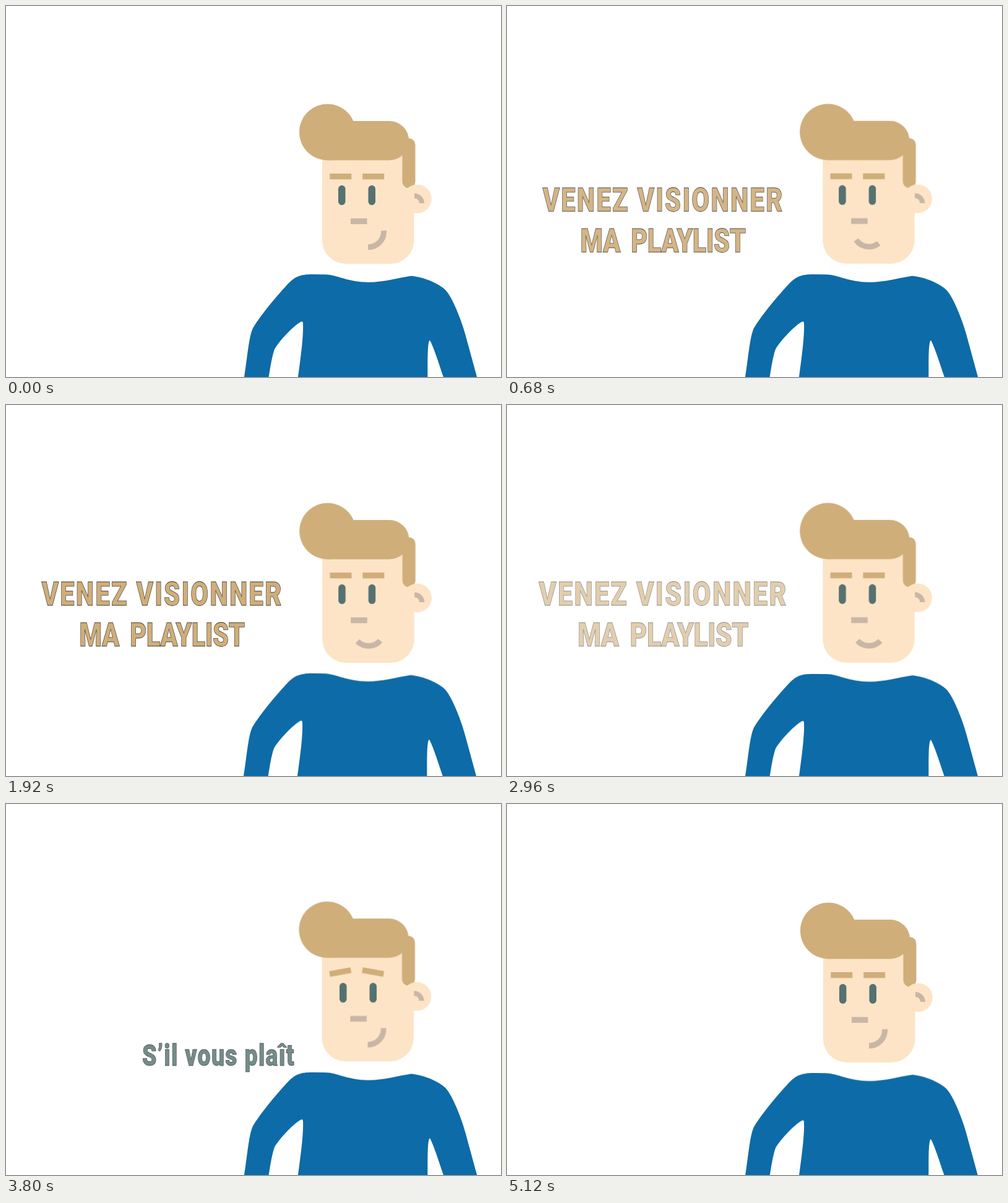
Recreate the animation shown at these times as an HTML page. Size 800 px wide and 600 px high, loop 5160 ms.

```html
<!DOCTYPE html>
<html lang="fr">
<head>
<meta charset="utf-8">
<title>Playlist</title>
<style>
  html, body { margin: 0; width: 100%; height: 100%; overflow: hidden; background: #fff; }
  svg { display: block; width: 800px; height: 600px; }

  /* One shared loop; percentages are ms / 51.6 */
  .anim { animation: 5160ms linear infinite both; }

  text {
    font: 900 53.5px Roboto, "Open Sans", sans-serif;
    text-anchor: middle;
    stroke-width: .8;
  }
  .invite { fill: #cfae7a; stroke: #413b34; }
  .please { fill: #557270; stroke: #28302f; }
  .please text { font-size: 48px; }

  #invite { transform-origin: 251.5px 340px; animation-name: invite-move; }
  #invite-fade { animation-name: invite-fade; }
  #please { transform-origin: 343px 396px; animation-name: please-move; }
  #please-fade { animation-name: please-fade; }

  @keyframes invite-move {
    0%, .78% { transform: translateY(100px); animation-timing-function: ease; }
    20.16% { transform: none; }
    51.55% { transform: none; animation-timing-function: cubic-bezier(.333, 0, .667, 0); }
    66.09%, 100% { transform: scaleX(1.5); }
  }
  @keyframes invite-fade {
    0%, .78% { opacity: 0; animation-timing-function: ease; }
    20.16%, 51.55% { opacity: 1; }
    66.09%, 100% { opacity: 0; }
  }
  @keyframes please-move {
    0%, 66.67% { transform: translateY(70px); animation-timing-function: ease; }
    80.23% { transform: none; }
    85.27% { transform: none; animation-timing-function: cubic-bezier(.333, 0, .667, 0); }
    97.29%, 100% { transform: scale(6); }
  }
  @keyframes please-fade {
    0%, 66.67% { opacity: 0; animation-timing-function: ease; }
    80.23%, 85.27% { opacity: 1; }
    97.29%, 100% { opacity: 0; }
  }

  /* Slight idle sway */
  #head { animation-name: head; animation-timing-function: ease-in-out; }
  #body { animation-name: body; animation-timing-function: ease-in-out; }
  @keyframes head {
    0% { transform: none; }
    13.18% { transform: translate(-.8px, -.3px); }
    37.21% { transform: translate(.2px, 0); }
    57.36% { transform: translate(-.7px, -.2px); }
    64.34% { transform: translate(-.2px, -1px); }
    82.17% { transform: translate(-.8px, -.6px); }
    99.22%, 100% { transform: translate(0, 1px); }
  }
  @keyframes body {
    0%, 13.18% { transform: none; }
    37.21% { transform: translate(-1px, .3px); }
    57.36% { transform: translate(0, .7px); }
    64.34% { transform: translate(0, -.3px); }
    82.17% { transform: none; }
    99.22%, 100% { transform: translate(0, 1.3px); }
  }

  /* The smile is one arc turning around its own circle */
  #mouth { transform-origin: 586px 365px; animation-name: mouth; animation-timing-function: ease-in-out; }
  @keyframes mouth {
    0%, 1% { transform: none; }
    12.4%, 13.5% { transform: rotate(55deg); }
    21%, 37.21% { transform: rotate(45deg); }
    57.36% { transform: rotate(47deg); }
    64.34% { transform: rotate(29deg); }
    70.5%, 100% { transform: none; }
  }

  .brow { transform-box: fill-box; transform-origin: center; animation-name: brow; animation-timing-function: ease-in-out; }
  #brow-l { --tilt: -11deg; }
  #brow-r { --tilt: 11deg; }
  @keyframes brow {
    0%, 67% { transform: none; }
    75%, 87% { transform: translateY(-3.3px) rotate(var(--tilt)); }
    95%, 100% { transform: none; }
  }
  #eyes { animation-name: eyes; animation-timing-function: ease-in-out; }
  @keyframes eyes {
    0%, 67% { transform: none; }
    75%, 87% { transform: translateX(2.7px); }
    95%, 100% { transform: none; }
  }

  .hair { fill: #d0ae7a; }
  .skin { fill: #fde4c6; }
  .eye { fill: #557270; }
  .shade { fill: #c8b6a6; }
  .line { fill: none; stroke: #c8b6a6; }
</style>
</head>
<body>
<svg viewBox="0 0 800 600">
  <g id="invite-fade" class="anim">
    <g id="invite" class="anim invite">
      <text transform="translate(252.5 323.5) scale(.78 1)" letter-spacing="2.9">VENEZ VISIONNER</text>
      <text transform="translate(252 389.5) scale(.78 1)" letter-spacing="-.65" word-spacing="9.5">MA PLAYLIST</text>
    </g>
  </g>
  <g id="please-fade" class="anim">
    <g id="please" class="anim please">
      <text transform="translate(343.5 410) scale(.78 1)" letter-spacing="1.7">S’il vous plaît</text>
    </g>
  </g>

  <path id="body" class="anim" fill="#0d6ba8" d="M384.4 604 C390 570 392 536 399 521
    C412 499 440 466 457 448 C470 435 480 434 497 434 L516 434.3
    C535 434.5 552 446.7 586 446.7 C610 446.7 632 440 655 436.5
    C676 438.5 700 449 710.5 459.5 C722 472 737 511 742 530 L762.2 604 H708.4
    C700 580 692 554 686 542.5 Q684.5 539.5 683.5 543 C681 553 681.5 575 681.5 604 H471.5
    C476 570 481 535 480 513 Q480 509 476 511 C464 518 443 540 434 555
    C430 566 427 585 424 604 Z"/>

  <g id="head" class="anim">
    <path class="skin" d="M511 240 H659.5 V379 A38 38 0 0 1 621.5 417 H549 A38 38 0 0 1 511 379 Z"/>
    <rect class="hair" x="640.5" y="214" width="21" height="80.5" rx="10.5"/>
    <path class="hair" d="M519.5 186 H619.5 A31.75 31.75 0 0 1 619.5 249.5 H519.5 Z"/>
    <circle class="hair" cx="519.5" cy="204" r="45.5"/>
    <circle class="skin" cx="664.5" cy="312" r="23.3"/>
    <path class="line" stroke-width="8" d="M660 307 A12 12 0 0 1 672 319"/>

    <rect id="brow-l" class="anim brow hair" x="523.3" y="271" width="35" height="9.4"/>
    <rect id="brow-r" class="anim brow hair" x="576.2" y="271" width="35" height="9.4"/>
    <g id="eyes" class="anim">
      <rect class="eye" x="537" y="290" width="11.5" height="32" rx="5.75"/>
      <rect class="eye" x="585.5" y="290" width="11.5" height="32" rx="5.75"/>
    </g>
    <rect class="shade" x="557" y="343.5" width="26.5" height="9.3"/>
    <g id="mouth" class="anim">
      <path class="line" stroke-width="9" d="M610.5 363.2 A25 25 0 0 1 585.1 390"/>
    </g>
  </g>
</svg>
</body>
</html>
```
